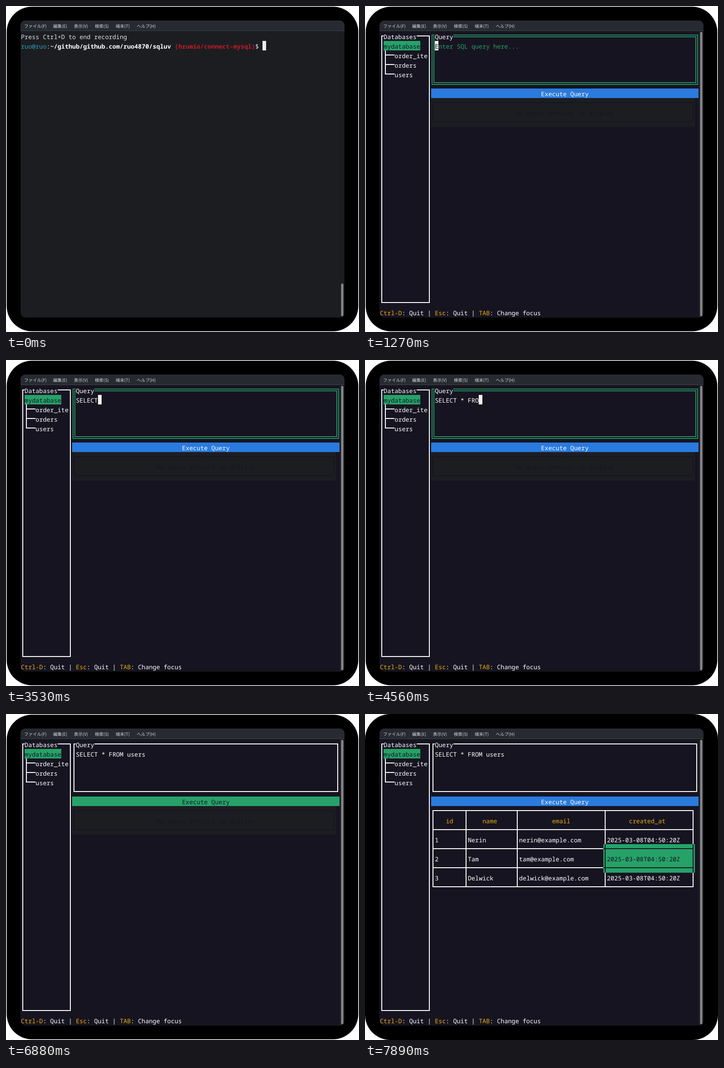
Write an HTML page with a canvas that moves like this. It is 779 px wide and 719 px high and loops after 8000 ms.

```html
<!DOCTYPE html>
<html lang="ja">
<head>
<meta charset="utf-8">
<style>
  html, body { margin: 0; width: 100%; height: 100%; overflow: hidden; background: #fff; }
  canvas { display: block; }
</style>
</head>
<body>
<canvas id="stage" width="779" height="719"></canvas>
<script>
const ctx = document.getElementById('stage').getContext('2d');
const LOOP = 8000;
const CELL = 8.08, LINE = 21, LEFT = 33, TOP = 56;
const COLOR = {
  term: '#1c1d21', black: '#171421', white: '#ffffff', text: '#e2e2e4', green: '#26a269',
  blue: '#2a7bde', yellow: '#e9ad0c', red: '#c01c28', cyan: '#2aa1b3'
};
const MONO = '13.467px "Noto Sans Mono", monospace';
const QUERY = 'SELECT * FROM users';
const PLACEHOLDER = 'Enter SQL query here...';

// [start time, value] pairs; the last one already started applies
const COMMAND_KEYS = [[0, ''], [250, 'sq'], [520, 'sqluv']];
const QUERY_KEYS = [
  [0, 0], [2270, 1], [2520, 3], [2780, 4], [3030, 5], [3290, 6], [3540, 7], [3790, 8], [4040, 10],
  [4300, 11], [4560, 12], [4810, 13], [5080, 14], [5340, 16], [6110, 18], [6370, 19]
];
const CURSOR = [[0, true], [1770, false], [2270, true], [5860, false], [6110, true], [6620, false]];
const at = (steps, t) => steps.filter(([start]) => start <= t).pop()[1];

const colX = col => LEFT + col * CELL;
const rowY = row => TOP + row * LINE;
const midX = col => Math.round(colX(col + 0.5));
const midY = row => Math.floor(rowY(row + 0.5));

function cells(col, row, width, height, color) {
  const x = Math.round(colX(col));
  ctx.fillStyle = color;
  ctx.fillRect(x, rowY(row), Math.round(colX(col + width)) - x, height * LINE);
}

function text(string, col, row, color = COLOR.white, weight = '') {
  ctx.font = `${weight} ${MONO}`;
  ctx.fillStyle = color;
  ctx.fillText(string, colX(col), rowY(row) + 17);
}

function line(x1, y1, x2, y2, color = COLOR.white) {
  ctx.strokeStyle = color;
  ctx.lineWidth = 2;
  ctx.beginPath();
  ctx.moveTo(x1, y1);
  ctx.lineTo(x2, y2);
  ctx.stroke();
}

// Frame running through the centres of its corner cells
function frame(col1, row1, col2, row2, color = COLOR.white, double = false) {
  ctx.strokeStyle = color;
  ctx.lineWidth = double ? 1.7 : 2;
  for (const grow of double ? [2, -2] : [0]) {
    const x = midX(col1) - grow, y = midY(row1) - grow;
    ctx.strokeRect(x, y, midX(col2) + grow - x, midY(row2) + grow - y);
  }
}

function panel(title, col1, row1, col2, row2, color, double) {
  frame(col1, row1, col2, row2, color, double);
  cells(col1 + 1, row1, title.length, 1, COLOR.black);
  text(title, col1 + 1, row1);
}

function round(x, y, w, h, r, color) {
  ctx.fillStyle = color;
  ctx.beginPath();
  ctx.roundRect(x, y, w, h, r);
  ctx.fill();
}

function drawMenu() {
  ctx.fillStyle = '#282a32';
  ctx.fillRect(32, 32, 715, 22);
  ctx.fillStyle = '#41434a';
  ctx.fillRect(32, 54, 715, 1);
  ctx.font = '9.5px "Noto Sans CJK JP", "Noto Sans CJK", sans-serif';
  ctx.fillStyle = '#d6d6da';
  const items = { 'ファイル(F)': 40, '編集(E)': 104, '表示(V)': 150, '検索(S)': 196, '端末(T)': 242, 'ヘルプ(H)': 288.5 };
  for (const [label, x] of Object.entries(items)) ctx.fillText(label, x, 47.5);
}

function drawShell(t) {
  const command = at(COMMAND_KEYS, t);
  text('Press Ctrl+D to end recording', 0, 0, COLOR.text);
  text('ruo@ruo', 0, 1, COLOR.cyan);
  text(':', 7, 1, COLOR.text);
  text('~/github/github.com/ruo4870/sqluv', 8, 1, COLOR.white, 'bold');
  text('(hrumio/connect-mysql)', 42, 1, COLOR.red, 'bold');
  text('$ ' + command, 64, 1, COLOR.text);
  cells(66 + command.length, 1, 1, 1, '#ececee');
}

function drawDialog(focused) {
  cells(27, 10, 33, 9, COLOR.blue);
  frame(27, 10, 59, 18, COLOR.white, true);
  text('No local files found. Would', 29, 12);
  text('you like to connect to a', 31, 13);
  text('database?', 39, 14);
  for (const [label, col] of [['New', 30], ['List', 38], ['Cancel', 47]]) {
    const on = label === focused;
    cells(col, 16, label.length + 4, 1, on ? COLOR.white : COLOR.black);
    text(label, col + 2, 16, on ? COLOR.black : COLOR.white);
  }
}

function drawTree() {
  panel('Databases', 0, 0, 13, 28);
  cells(1, 1, 10, 1, COLOR.green);
  text('mydatabase', 1, 1, COLOR.black);
  line(midX(1), rowY(2), midX(1), midY(4) + 1);
  ['order_ite', 'orders', 'users'].forEach((name, i) => {
    line(midX(1), midY(2 + i), colX(4), midY(2 + i));
    text(name, 4, 2 + i);
  });
}

function drawQuery(t, focused) {
  const typed = QUERY.slice(0, at(QUERY_KEYS, t));
  panel('Query', 14, 0, 86, 5, focused ? COLOR.green : COLOR.white, focused);
  text(typed || PLACEHOLDER, 15, 1, typed ? COLOR.white : COLOR.green);
  if (focused && at(CURSOR, t)) {
    cells(15 + typed.length, 1, 1, 1, '#f0f0f0');
    if (!typed) text(PLACEHOLDER[0], 15, 1, COLOR.black);
  }
}

function drawButton(focused) {
  cells(14, 6, 73, 1, focused ? COLOR.green : COLOR.blue);
  text('Execute Query', 44, 6, focused ? COLOR.black : COLOR.white);
}

function drawEmptyResult() {
  cells(14, 7, 72, 3, COLOR.term);
  frame(14, 7, 85, 9, COLOR.black);
  text('No query results to display', 37, 8, COLOR.black);
}

function drawResult(selected) {
  const edges = [14, 23, 37, 61, 85];
  const date = '2025-03-08T04:50:20Z';
  const people = ['Nerin', 'Tam', 'Delwick'];
  for (const row of [7, 9, 11, 13, 15]) line(midX(14) - 1, midY(row), midX(85) + 1, midY(row));
  for (const col of edges) line(midX(col), midY(7), midX(col), midY(15));
  [['id', 18], ['name', 28], ['email', 47], ['created_at', 68]]
    .forEach(([label, col]) => text(label, col, 8, COLOR.yellow));
  if (selected) {
    cells(61, 11, 25, 3, COLOR.green);
    for (const col of [61, 85]) line(midX(col), rowY(11), midX(col), rowY(14), COLOR.black);
    for (const row of [11, 13]) line(colX(61), midY(row), midX(85), midY(row), COLOR.black);
  }
  people.forEach((name, i) => {
    const values = [String(i + 1), name, name.toLowerCase() + '@example.com', date];
    values.forEach((value, c) => {
      const dark = selected && i === 1 && c === 3;
      text(value, edges[c] + 1, 10 + 2 * i, dark ? COLOR.black : COLOR.white);
    });
  });
}

function drawFooter() {
  text('      : Quit |    : Quit |    : Change focus', 0, 29);
  text('Ctrl-D', 0, 29, COLOR.yellow);
  text('Esc', 15, 29, COLOR.yellow);
  text('TAB', 27, 29, COLOR.yellow);
}

function drawApp(t) {
  cells(0, 0, 87, 30, COLOR.black);
  drawTree();
  drawQuery(t, t < 6620);
  drawButton(t >= 6620 && t < 7640);
  if (t < 7130) drawEmptyResult();
  else drawResult(t >= 7640);
  drawFooter();
}

function draw(t) {
  ctx.fillStyle = '#fff';
  ctx.fillRect(0, 0, 779, 719);
  const inset = t < 7130 ? 1.5 : 0;
  round(inset, inset, 779 - 2 * inset, 719 - 2 * inset, 56, '#000');

  ctx.save();
  ctx.beginPath();
  ctx.roundRect(32, 32, 715, 655, 11);
  ctx.clip();
  ctx.fillStyle = COLOR.term;
  ctx.fillRect(32, 32, 715, 655);
  drawMenu();
  if (t < 770) drawShell(t);
  else if (t < 1270) drawDialog(t < 1020 ? 'New' : 'List');
  else drawApp(t);
  const barTop = t < 770 ? 612 : 57;
  round(739.5, barTop, 5, 684.5 - barTop, 2.5, '#86878b');
  ctx.restore();
}

ctx.textRendering = 'geometricPrecision';
const start = performance.now();
function tick() {
  draw((performance.now() - start) % LOOP);
  requestAnimationFrame(tick);
}
tick();
</script>
</body>
</html>
```
